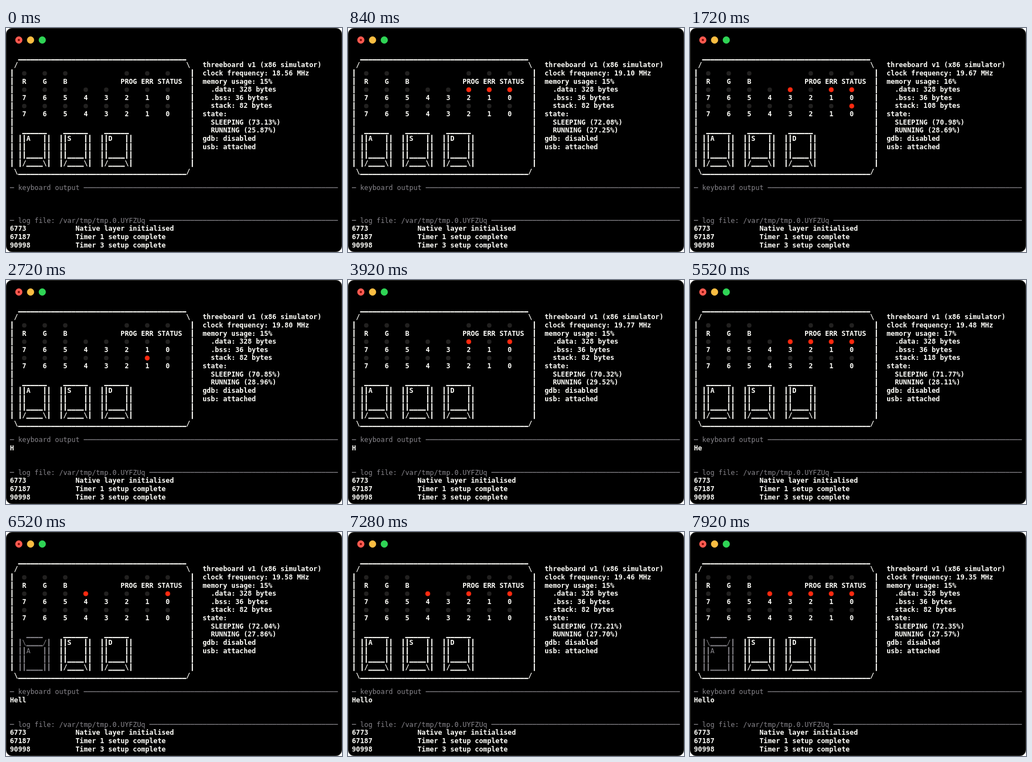
Animation of 602 by 401 pixels, one loop 8000 ms. Source, as an HTML page with a canvas:

```html
<!DOCTYPE html>
<html lang="en">
<head>
<meta charset="utf-8">
<title>threeboard simulator</title>
<style>
  html, body { margin: 0; width: 100%; height: 100%; overflow: hidden; background: #fff; }
  canvas { display: block; }
</style>
</head>
<body>
<canvas id="stage" width="602" height="401"></canvas>
<script>
const ctx = document.getElementById('stage').getContext('2d');
const LOOP = 8000, STEP = 40, PRESS = 60;
const LEFT = 7, TOP = 70.2, CELL = 7.345, LINE = 14.65;
const BRIGHT = '#fffffa', DIM = '#88868c', LED_OFF = '#222120', LED_ON = '#ff2a10';
const FAMILY = '12.2px "DejaVu Sans Mono", monospace';

// Key presses: [keys, first time, interval, count]
const presses = [
  ['A', 60, 120, 11], ['S', 1560, 240, 2], ['D', 1960, 0, 1],
  ['AS', 2520, 0, 1], ['SD', 2960, 0, 1],
  ['A', 3240, 150, 8], ['D', 4540, 0, 1],
  ['A', 4780, 110, 7], ['D', 5640, 320, 2],
  ['A', 6220, 280, 2], ['A', 6660, 0, 1], ['D', 6880, 0, 1],
  ['A', 7084, 68, 13],
].flatMap(([keys, start, gap, count]) =>
  Array.from({ length: count }, (_, i) => ({ keys, at: start + i * gap })));

const pauses = [[840, 920], [2080, 2480], [2720, 2880], [4600, 4760]];

// time, MHz, sleeping %, running %
const readings = [
  [0, 18.56, 73.13, 25.87], [1720, 19.67, 70.98, 28.69], [2720, 19.80, 70.85, 28.96],
  [3920, 19.77, 70.32, 29.52], [5520, 19.48, 71.77, 28.11],
  [6520, 19.58, 72.04, 27.86], [7920, 19.35, 72.35, 27.57],
];

function reading(t) {
  const i = readings.findIndex(r => r[0] > t);
  if (i < 0) return readings[readings.length - 1].slice(1);
  const a = readings[i - 1], b = readings[i], p = (t - a[0]) / (b[0] - a[0]);
  return [1, 2, 3].map(n => a[n] + (b[n] - a[n]) * p);
}

function boardAt(t) {
  const s = { low: 0, high: 0, typed: 0, held: '' };
  for (const { keys, at } of presses) {
    if (at > t) break;
    if (keys === 'A') s.low++;
    if (keys === 'S') s.high++;
    if (keys === 'D') s.typed++;
    if (keys === 'AS') s.low = 0;
    if (keys === 'SD') s.high = 0;
    if (t < at + PRESS) s.held = keys;
  }
  return s;
}

function put(str, row, col, color = BRIGHT) {
  const y = TOP + row * LINE;
  ctx.fillStyle = color;
  ctx.font = (color === BRIGHT ? 'bold ' : '') + FAMILY;
  [...str].forEach((ch, i) => {
    const x = LEFT + (col + i) * CELL;
    if (ch === '_') ctx.fillRect(x, y + 0.5, CELL + 0.1, 2);
    else if (ch === '|') ctx.fillRect(x + CELL / 2 - 1, y - 10.8, 2, 13.6);
    else if (ch === '─') ctx.fillRect(x, y - 4.8, CELL + 0.1, 1.3);
    else if (ch !== ' ') ctx.fillText(ch, x, y);
  });
}

function disc(x, y, r, color) {
  ctx.fillStyle = color;
  ctx.beginPath();
  ctx.arc(x, y, r, 0, Math.PI * 2);
  ctx.fill();
}

function led(slot, row, on) {
  const x = LEFT + (3.5 + slot * 5) * CELL, y = 66.5 + row * LINE;
  if (on) disc(x, y, 4.7, '#7a1204');
  disc(x, y, 4, on ? LED_ON : LED_OFF);
}

function bank(value, row) {
  for (let i = 0; i < 8; i++) {
    led(i, row, value >> (7 - i) & 1);
    put(String(7 - i), row + 1, 3 + i * 5);
  }
}

function key(name, col, down) {
  const art = down
    ? ['  ____', '|\\____/|', `||${name}   ||`, '||    ||', '||____||']
    : [' ______', `||${name}   ||`, '||    ||', '||____||', '|/____\\|'];
  art.forEach((line, i) => put(line, 8 + i, col, down ? DIM : BRIGHT));
}

function heading(text, row) {
  put(`─ ${text} `.padEnd(80, '─'), row, 0, DIM);
}

function frame() {
  ctx.clearRect(0, 0, 602, 401);
  ctx.beginPath();
  ctx.roundRect(0.5, 0.5, 601, 400, 10);
  ctx.fillStyle = '#000';
  ctx.fill();
  ctx.strokeStyle = '#2e2e2a';
  ctx.stroke();
  ['#ff5a50', '#fabd42', '#2fd455'].forEach((c, i) => disc(23 + i * 21, 21.5, 6.4, c));
  disc(23, 21.5, 2, '#7c0a06');
}

function board(s) {
  const edge = '_'.repeat(41);
  put(edge, -1, 2);
  put('/', 0, 1);
  put('\\', 0, 43);
  for (let row = 1; row <= 12; row++) {
    put('|', row, 0);
    put('|', row, 44);
  }
  put('\\' + edge + '/', 13, 1);
  [0, 1, 2, 5, 6, 7].forEach(slot => led(slot, 1, false));
  put('R    G    B             PROG ERR STATUS', 2, 3);
  bank(s.low, 3);
  bank(s.high, 5);
  [...'ASD'].forEach((name, i) => key(name, 2 + i * 10, s.held.includes(name)));
}

function stats(t) {
  const [mhz, sleeping, running] = reading(t).map(v => v.toFixed(2));
  const within = (a, b) => t >= a && t < b;
  const [stack, usage] = within(1680, 1760) ? [108, 16] : within(5480, 5560) ? [118, 17] : [82, 15];
  [
    'threeboard v1 (x86 simulator)',
    `clock frequency: ${mhz} MHz`,
    `memory usage: ${usage}%`,
    '  .data: 328 bytes',
    '  .bss: 36 bytes',
    `  stack: ${stack} bytes`,
    'state:',
    `  SLEEPING (${sleeping}%)`,
    `  RUNNING (${running}%)`,
    'gdb: disabled',
    'usb: attached',
  ].forEach((line, row) => put(line, row, 47));
}

function draw(now) {
  let t = Math.floor(now % LOOP / STEP) * STEP;
  const pause = pauses.find(([a, b]) => t >= a && t < b);
  if (pause) t = pause[0];
  const s = boardAt(t);
  frame();
  board(s);
  stats(t);
  heading('keyboard output', 15);
  put('Hello'.slice(0, s.typed), 16, 0);
  heading('log file: /var/tmp/tmp.0.UYFZUq', 19);
  [['6773', 'Native layer initialised'], ['67187', 'Timer 1 setup complete'],
   ['90998', 'Timer 3 setup complete']].forEach(([stamp, text], i) => {
    put(stamp, 20 + i, 0);
    put(text, 20 + i, 16);
  });
}

let origin;
function tick(now) {
  origin ??= now;
  draw(now - origin);
  requestAnimationFrame(tick);
}
draw(0);
requestAnimationFrame(tick);
</script>
</body>
</html>
```
